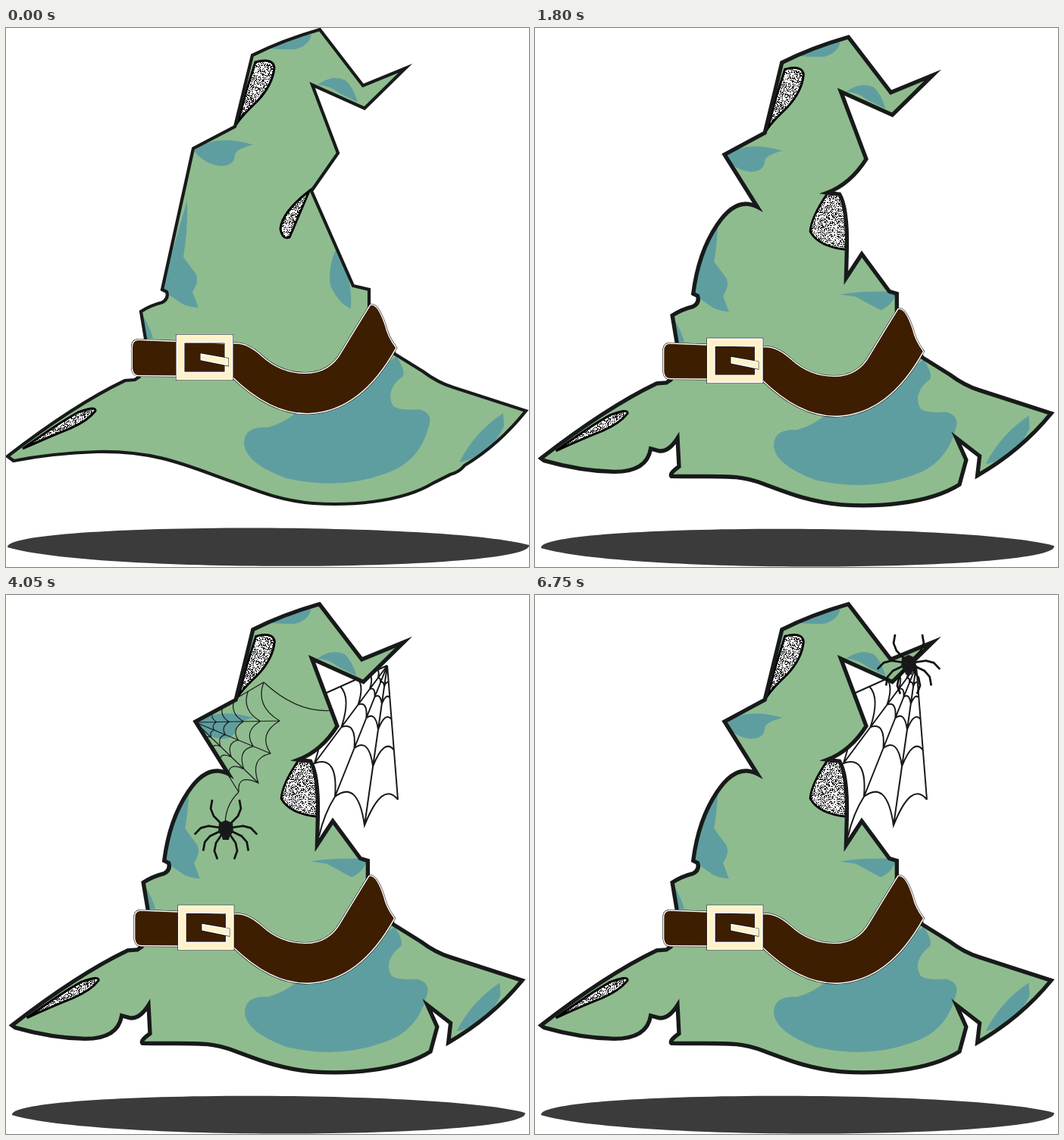
An HTML page with a canvas that plays this animation: 690 by 711 pixels, repeating every 7200 ms.

```html
<!DOCTYPE html>
<html lang="en">
<head>
<meta charset="utf-8">
<title>Witch hat</title>
<style>
  html, body { margin: 0; width: 100%; height: 100%; overflow: hidden; background: #fff; }
  canvas { display: block; }
</style>
</head>
<body>
<canvas id="stage" width="690" height="711"></canvas>
<script>
const ctx = document.getElementById('stage').getContext('2d');
const STEP = 450, STEPS = 16;
const INK = '#181a1a', GREEN = '#8fbc8f', BLUE = '#5f9ea0', BROWN = '#3d1e00', CREAM = '#fff2c9';
const shape = d => new Path2D(d);

// The hat outline, with each torn part chosen by how far the hat has decayed.
function hatPath(step) {
  const neck = step < 1 ? 'L247 159'
    : 'Q213 290 238 253 Q264 214 292 229 L248 159';
  const side = step < 3 ? 'L403 215 L458 340'
    : 'Q417 198 386 210 L402 212 Q413 230 412 285 L411 324 L432 292 L469 342';
  const right = step < 2 ? 'Q650 550 605 577 Q598 586 586 589 L564 600'
    : 'Q645 555 587 588 L590 562 ' + (step < 4 ? '' : 'L559 538 ') + 'L572 567 L563 600';
  const spike = step < 4 ? 'L181 534 Q173 564 157 564 L150 561' : 'L185 538 Q173 557 160 555 L149 552';
  const left = step < 3 ? 'C245 580 200 557 120 559 Q60 561 10 571'
    : `C265 586 250 590 177 589 Q173 586 187 576 ${spike} Q144 583 100 583 Q55 582 6 568`;
  return shape(`M414 2 L471 76 L527 53 L473 106 L404 75 L438 165 ${side} L479 345 L479 372
    L513 430 L550 453 Q570 468 590 474 L686 505 ${right}
    C520 627 450 630 405 627 C360 623 330 610 300 599 ${left} L2 565
    Q90 497 157 465 L170 464 L176 460 L184 440 L184 410 L178 374
    Q190 366 206 362 Q215 357 212 348 L206 345 ${neck} L302 130 L325 36 Q365 16 414 2 Z`);
}

const patches = shape(`M348 27 Q375 8 403 9 Q400 23 382 28 Q365 29 348 27 Z
  M411 75 Q430 61 448 69 Q458 78 464 98 L440 86 Q425 75 411 75 Z
  M248 162 Q275 139 326 154 Q302 160 302 168 Q301 182 283 182 Q262 180 248 162 Z
  M239 227 Q240 270 234 302 L251 325 Q255 335 246 348 L254 369 Q236 368 227 360 L205 345 Z
  M181 380 Q190 395 194 409 L184 410 Z
  M515 433 Q531 458 520 462 Q500 480 511 499 Q520 505 545 503 Q564 508 558 525 Q546 573 500 588
    Q440 610 370 594 Q318 575 314 550 Q313 525 345 527 Q370 520 385 505 L450 480 Z
  M656 508 Q618 533 598 573 Q640 564 657 525 Z`);
const sidePatch = shape('M435 292 Q424 320 428 340 Q440 365 455 370 Q457 345 449 320 Z');
const tornSidePatch = shape('M402 346 Q430 341 480 342 Q472 362 457 367 L424 349 Z');

const topHole = shape('M329 45 Q352 39 354 52 Q352 75 331 97 Q313 114 306 124 L318 80 Z');
const brimHole = shape('M22 555 Q68 522 95 507 Q119 498 118 505 Q108 518 85 528 Q55 540 22 555 Z');
const slit = shape('M400 215 Q364 243 362 265 Q365 280 374 276 Q380 262 400 215 Z');
const gap = shape('M386 211 Q364 243 363 262 Q374 282 411 286 Q414 230 402 212 Z');

const belt = shape(`M175 412 Q167 412 167 421 L167 449 Q168 458 175 458 L298 459
  Q350 510 400 508 Q468 505 514 422 Q503 407 500 393 Q490 363 481 366
  Q458 403 443 428 Q427 456 395 456 Q362 456 337 433 Q316 414 298 417 Z`);
const buckle = shape('M226 406 H298 V463 H226 Z M234 414 V455 H290 V414 Z');
const pin = shape('M258 431 L292 437 V444 L258 437 Z');
const shadow = shape('M2 685 C-4 653 570 650 690 682 C698 716 124 721 2 685 Z');

const speckle = (() => {
  const tile = document.createElement('canvas');
  tile.width = tile.height = 128;
  const t = tile.getContext('2d');
  let seed = 7;
  t.fillStyle = '#fff';
  for (let i = 0; i < 128 * 128; i++) {
    seed = (seed * 1664525 + 1013904223) >>> 0;
    if (seed / 2 ** 32 < 0.66) t.fillRect(i % 128, i >> 7, 1, 1);
  }
  return ctx.createPattern(tile, 'repeat');
})();

function fill(path, color) {
  ctx.fillStyle = color;
  ctx.fill(path);
}

function stroke(path, color, width) {
  ctx.strokeStyle = color;
  ctx.lineWidth = width;
  ctx.stroke(path);
}

function hole(path) {
  fill(path, '#000');
  fill(path, speckle);
  stroke(path, '#000', 3);
}

function edged(path, color) {
  stroke(path, '#000', 4);
  stroke(path, '#fff', 3);
  fill(path, color);
}

function drawHat(step) {
  const hat = hatPath(step), torn = step >= 3;
  fill(hat, GREEN);
  ctx.save();
  ctx.clip(hat);
  fill(patches, BLUE);
  fill(torn ? tornSidePatch : sidePatch, BLUE);
  ctx.restore();
  [topHole, brimHole, torn ? gap : slit].forEach(hole);
  stroke(hat, INK, step < 4 ? 4.2 : 5.4);
  edged(belt, BROWN);
  edged(buckle, CREAM);
  edged(pin, CREAM);
}

// Spokes from an apex, joined by threads that sag towards it.
function web(x, y, ends, rings, width) {
  const at = ([ex, ey], f) => [x + (ex - x) * f, y + (ey - y) * f];
  const path = new Path2D();
  for (const end of ends) {
    path.moveTo(x, y);
    path.lineTo(...end);
  }
  for (const f of rings) {
    path.moveTo(...at(ends[0], f));
    for (let i = 1; i < ends.length; i++) {
      const [a, b] = [ends[i - 1], ends[i]];
      path.quadraticCurveTo(...at([(a[0] + b[0]) / 2, (a[1] + b[1]) / 2], f * 0.78), ...at(b, f));
    }
  }
  return { path, width };
}

const tipWeb = web(503, 93, [[517, 270], [473, 304], [434, 266], [407, 222], [405, 137]],
  [0.13, 0.24, 0.4, 0.63, 1], 2);
tipWeb.path.addPath(shape('M434 266 Q420 288 413 318'));
const neckWeb = web(250, 168, [[340, 115], [361, 166], [349, 209], [333, 248], [307, 260]],
  [0.25, 0.4, 0.57, 0.77, 1], 1.2);
const sideWeb = web(431, 299, [[371, 360], [382, 377], [413, 384], [448, 385], [477, 373]],
  [0.2, 0.36, 0.54, 0.75, 1], 1.2);
const thread = d => ({ path: shape(d), width: 1.2 });

// Everything spun on the hat, with the step at which it appears.
const spun = [
  [7, thread('M432 152 Q385 157 340 115')],
  [8, neckWeb],
  [9, thread('M307 260 Q288 278 289 307')],
  [10, thread('M289 307 C291 340 317 360 350 360 Q362 360 376 356')],
  [11, sideWeb],
  [12, thread('M448 376 Q460 402 470 430 Q477 450 481 472')],
  [13, thread('M481 472 C487 505 485 530 473 545 C455 567 410 565 372 558')]
];

// Spider place and heading in degrees.
const poses = {
  5: [493, 90, 90], 6: [391, 63, 105], 7: [340, 122, 130], 8: [306, 194, 75], 9: [290, 308, 90],
  10: [374, 357, 0], 11: [430, 352, 90], 12: [480, 470, 80], 13: [361, 555, 199], 15: [493, 90, 90]
};

const legs = new Path2D();
for (const side of [-1, 1]) {
  for (const deg of [20, 50, 84, 150]) {
    const a = deg * Math.PI / 180, bend = deg < 90 ? 0.25 : -0.25;
    const point = (r, angle) => [r * Math.cos(angle), side * r * Math.sin(angle)];
    legs.moveTo(0, 0);
    legs.lineTo(...point(23, a + bend));
    legs.lineTo(...point(33, a + bend / 2));
    legs.lineTo(...point(42, a - bend / 3));
  }
}
const body = shape('M-11 0 L-7 -9 L4 -10 L11 -5 L15 -4 V4 L11 5 L4 10 L-7 9 Z');

function drawSpider([x, y, heading]) {
  ctx.save();
  ctx.translate(x, y);
  ctx.rotate(heading * Math.PI / 180);
  stroke(legs, '#111', 2.7);
  fill(body, INK);
  ctx.restore();
}

function draw() {
  const step = Math.floor(performance.now() / STEP) % STEPS;
  ctx.clearRect(0, 0, 690, 711);
  ctx.imageSmoothingEnabled = false;
  if (step >= 5) stroke(tipWeb.path, INK, tipWeb.width);
  ctx.save();
  if (step >= 4) ctx.transform(0.984, 0, 0, 0.987, 6, 10);
  fill(shadow, '#3b3b3b');
  drawHat(step);
  ctx.restore();
  if (step < 15) {
    for (const [start, line] of spun) {
      if (step >= start) stroke(line.path, INK, line.width);
    }
  }
  if (poses[step]) drawSpider(poses[step]);
  requestAnimationFrame(draw);
}
draw();
</script>
</body>
</html>
```
